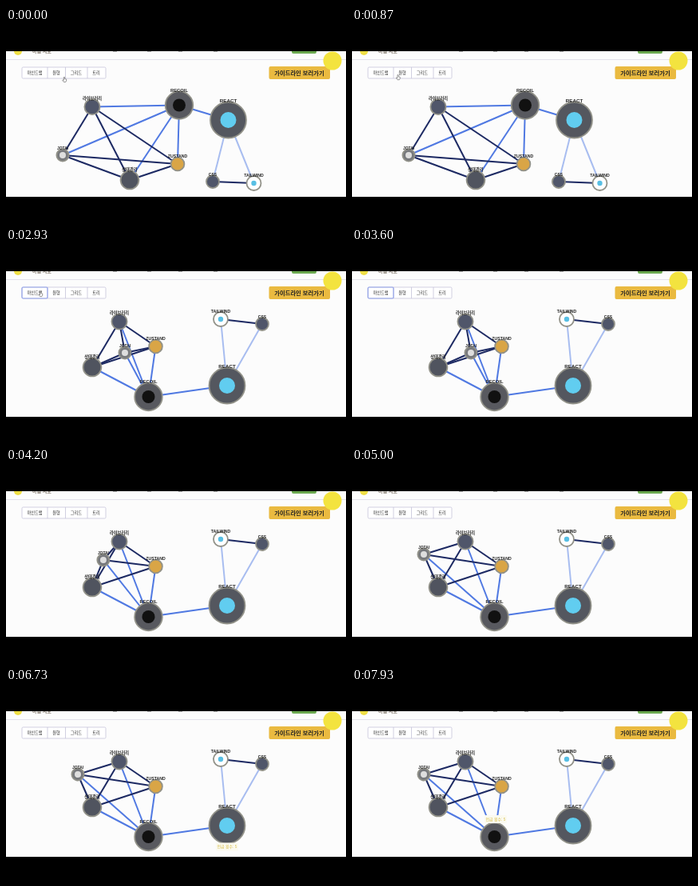
An HTML page for the animation above (8 s loop, 426x240 px).

```html
<!DOCTYPE html>
<html lang="ko">
<head>
<meta charset="utf-8">
<title>Mind map</title>
<style>
  html, body { margin: 0; width: 100%; height: 100%; overflow: hidden; background: #000; }
  svg { display: block; width: 100vw; height: 100vh; }
  text { font-family: "Noto Sans CJK KR", "Noto Sans CJK", "Noto Sans", sans-serif; text-anchor: middle; fill: #222; }
  .label { font-family: "Liberation Sans", "Noto Sans CJK KR", "Noto Sans CJK", sans-serif; font-weight: bold; }
  .tab { font-size: 5.2px; font-weight: 500; }
</style>
</head>
<body>
<svg viewBox="0 0 426 240">
  <rect width="426" height="240" fill="#000"/>
  <rect y="29" width="426" height="182" fill="#fcfcfc"/>
  <clipPath id="page"><rect y="29" width="426" height="182"/></clipPath>
  <g clip-path="url(#page)">
    <circle cx="15" cy="29" r="5" fill="#eede45"/>
    <text x="45" y="30.5" font-size="6" font-weight="bold" style="fill:#7d7468">마음 지도</text>
    <g fill="#777">
      <rect x="134" y="28" width="5" height="1.6"/><rect x="177" y="28" width="5" height="1.6"/>
      <rect x="216" y="28" width="5" height="1.6"/><rect x="260" y="28" width="5" height="1.6"/>
    </g>
    <rect x="358" y="22" width="31" height="10" rx="2" fill="#6aa84f"/>
    <path d="M0 39.500H426" stroke="#e3e1ea"/>
  </g>
  <g id="tabs">
    <rect x="20" y="49" width="105" height="14" rx="1.5" fill="#fff" stroke="#c6c3da" stroke-width=".8"/>
    <path d="M52 49v14M74.500 49v14M102 49v14" stroke="#c6c3da" stroke-width=".8"/>
    <rect id="focus" x="20" y="49" width="32" height="14" rx="1.5" fill="none" stroke="#94a5ec" stroke-width="1.2"/>
    <text class="tab" x="36" y="57.900">마인드맵</text>
    <text class="tab" x="63" y="57.900">원형</text>
    <text class="tab" x="88" y="57.900">그리드</text>
    <text class="tab" x="113" y="57.900">트리</text>
  </g>
  <rect x="329.500" y="48" width="76.500" height="16" rx="2" fill="#eaba40"/>
  <text x="367.500" y="58.700" font-size="7.300" font-weight="bold">가이드라인 보러가기</text>
  <g id="edges"></g>
  <g id="nodes"></g>
  <g id="tip">
    <rect x="-14" y="-5" width="28" height="10" rx="1.5" fill="#fbfaf0"/>
    <text y="1.800" font-size="4.900" style="fill:#d5b93c">언급 횟수: 5</text>
  </g>
  <circle cx="409" cy="41" r="11.500" fill="#f3e33f"/>
  <path id="hand" d="M-.6-2.500q.6-.8 1.200 0v2l2 .5v2l-.8 1.500h-2.400l-1.700-2.300q.3-.9 1.700.2z" fill="#fff" stroke="#555" stroke-width=".6"/>
</svg>
<script>
const LOOP = 8000;
const $ = id => document.getElementById(id);

function add(parent, tag, attrs, text) {
  const el = document.createElementNS("http://www.w3.org/2000/svg", tag);
  for (const k in attrs) el.setAttribute(k, attrs[k]);
  if (text) el.textContent = text;
  return parent.appendChild(el);
}

// poses: start, mid-layout, settled
const nodes = {
  react:    { name: "REACT", r: 22.5, font: 6.2, fill: "#54575f", mark: "#61cdf0", size: 10, poses: [[278.5, 115], [226, 103], [277, 172]] },
  recoil:   { name: "RECOIL", r: 17.3, font: 5.8, fill: "#58595f", mark: "#111", size: 8, poses: [[217, 96.5], [238, 120], [178.5, 186]] },
  library:  { name: "라이브러리", r: 9.6, font: 5.2, fill: "#50566a", poses: [[108, 98.5], [165, 167], [142, 92]] },
  state:    { name: "상태관리", r: 11.4, font: 5.3, fill: "#50545f", poses: [[155, 190], [191, 192], [108, 149]] },
  zustand:  { name: "ZUSTAND", r: 8.4, font: 5.2, fill: "#d9a546", poses: [[215, 170], [161, 140], [187.5, 123]] },
  jotai:    { name: "JOTAI", r: 7.6, font: 4.9, fill: "#77797d", mark: "#dedede", size: 4, poses: [[71, 159], [167, 109], [149, 131]] },
  tailwind: { name: "TAILWIND", r: 9, font: 5.2, fill: "#fff", mark: "#58bfe4", size: 3.2, poses: [[310.5, 194], [271, 133], [269, 89]] },
  css:      { name: "CSS", r: 8, font: 5, fill: "#50566a", poses: [[259, 192], [268, 167], [321, 95]] }
};

const DARK = "#1d2a63", MID = "#5079e2", LIGHT = "#a8bdf0";
const edges = [];
function link(color, from, ...targets) {
  for (const to of targets)
    edges.push({ a: nodes[from], b: nodes[to], el: add($("edges"), "line", { stroke: color }) });
}
link(LIGHT, "react", "css", "tailwind");
link(MID, "recoil", "library", "state", "zustand", "jotai", "react");
link(DARK, "library", "state", "zustand", "jotai");
link(DARK, "jotai", "state", "zustand");
link(DARK, "state", "zustand");
link(DARK, "css", "tailwind");

for (const n of Object.values(nodes)) {
  n.el = add($("nodes"), "g", {});
  add(n.el, "circle", { r: n.r, fill: n.fill, stroke: "#929289", "stroke-width": 1.8 });
  if (n.mark) add(n.el, "circle", { r: n.size, fill: n.mark });
  add(n.el, "text", { class: "label", y: -n.r + .6, "font-size": n.font }, n.name);
}

const mix = (a, b, p) => a + (b - a) * p;
const clamp = (v, lo, hi) => Math.min(hi, Math.max(lo, v));
const ease = p => p * p * (3 - 2 * p);
const progress = (t, from, to) => ease(clamp((t - from) / (to - from), 0, 1));

const pointer = [
  [0, 73, 64], [450, 73, 64], [1350, 40, 58], [2930, 43, 57], [3650, 149, 131],
  [3900, 149, 131], [4200, 122, 115], [4600, 90, 108], [5000, 204, 118]
];
function pointerAt(t) {
  const i = Math.max(1, pointer.findIndex(k => k[0] >= t));
  const a = pointer[i - 1], b = pointer[i], p = (t - a[0]) / (b[0] - a[0]);
  return [mix(a[1], b[1], p), mix(a[2], b[2], p)];
}

const move = (el, x, y, scale = 1) =>
  el.setAttribute("transform", `translate(${x} ${y}) scale(${scale})`);
const show = (el, on) => el.setAttribute("visibility", on ? "visible" : "hidden");

function draw(t) {
  const gather = progress(t, 1450, 1800), spread = progress(t, 1800, 2450);
  const zoom = mix(mix(1, .66, gather), 1, spread);

  for (const n of Object.values(nodes)) {
    const [a, b, c] = n.poses;
    n.x = mix(mix(a[0], b[0], gather), c[0], spread);
    n.y = mix(mix(a[1], b[1], gather), c[1], spread);
  }
  if (t > 3900) [nodes.jotai.x, nodes.jotai.y] = pointerAt(Math.min(t, 4600));

  for (const n of Object.values(nodes)) move(n.el, n.x, n.y, zoom);
  for (const { a, b, el } of edges) {
    el.setAttribute("x1", a.x);
    el.setAttribute("y1", a.y);
    el.setAttribute("x2", b.x);
    el.setAttribute("y2", b.y);
    el.setAttribute("stroke-width", 2 * zoom);
  }

  show($("focus"), t > 1400 && t < 3650);
  const overReact = t > 5700 && t < 7100, overRecoil = t > 7500;
  show($("tip"), overReact || overRecoil);
  if (overRecoil) move($("tip"), 180, 164);
  else move($("tip"), 277, 198.5);

  // the hand shows only over the tabs
  show($("hand"), t < 3000);
  move($("hand"), ...pointerAt(Math.min(t, 5000)));
}

const start = performance.now();
function tick() {
  draw((performance.now() - start) % LOOP);
  requestAnimationFrame(tick);
}
tick();
</script>
</body>
</html>
```
